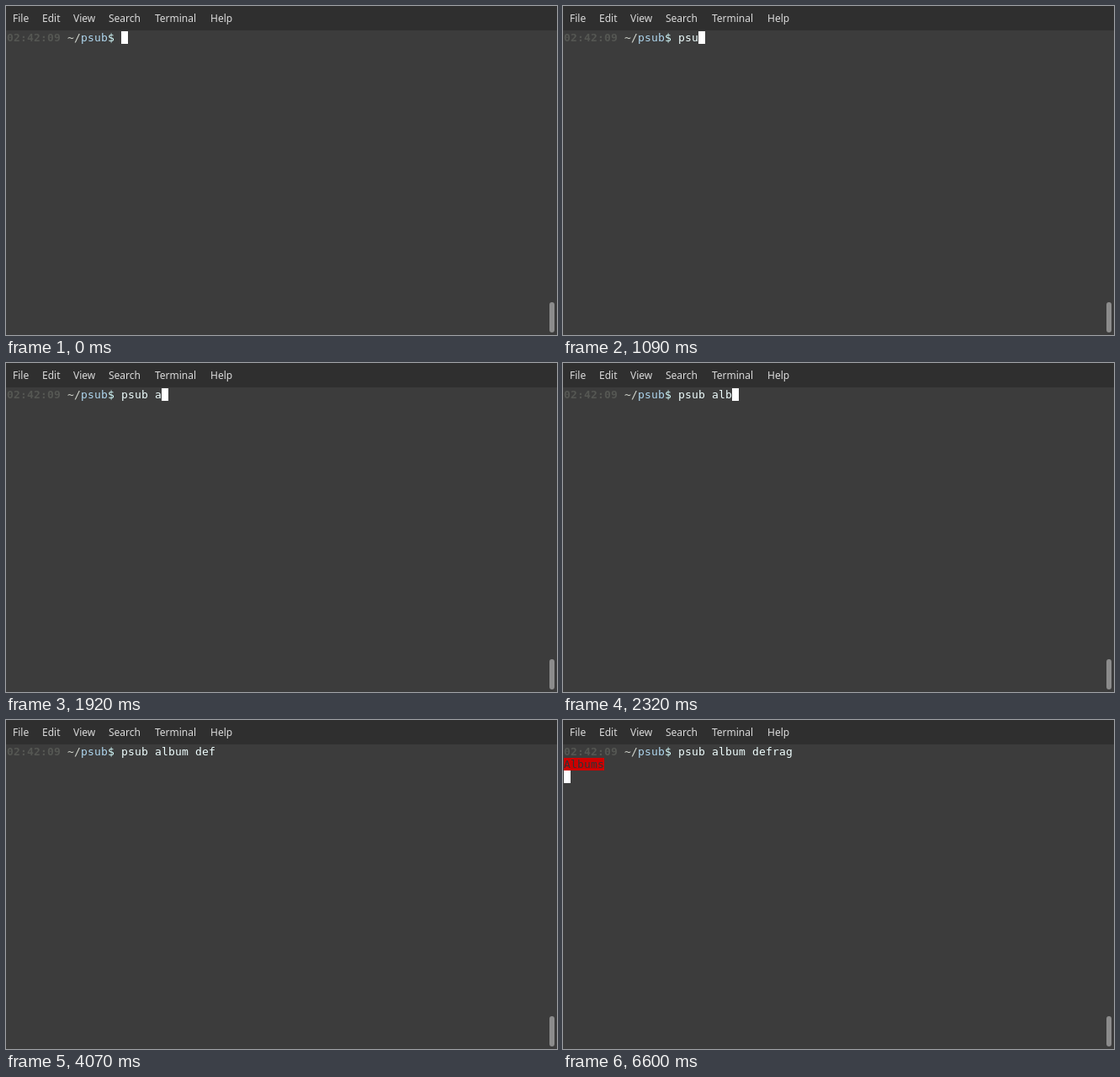
An HTML page for the animation above (8 s loop, 655 by 391 pixels).

```html
<!DOCTYPE html>
<html lang="en">
<head>
<meta charset="utf-8">
<title>Terminal</title>
<style>
  html, body { margin: 0; width: 100%; height: 100%; overflow: hidden; background: #3c3c3c; }
  #stage { position: relative; width: 655px; height: 391px; overflow: hidden; background: #3c3c3c; }
  #menu { position: absolute; left: 0; top: 0; width: 100%; height: 29px; background: #2f2f2f;
    font: 12px/17px "Noto Sans", sans-serif; color: #dadada; }
  #menu span { position: absolute; top: 6px; white-space: pre; }
  .row { position: absolute; left: 1px; height: 15px; white-space: pre;
    font: 13px/15px "DejaVu Sans Mono", monospace; letter-spacing: calc(8px - 1ch); }
  .time { color: #555753; font-weight: bold; }
  .home { color: #d3d7cf; }
  .dir { color: #afd7ef; }
  .mark { color: #d7ffff; }
  #cmd { color: #f0ffff; }
  #out { top: 45px; width: 48px; background: #c00; color: #2e3436; }
  #cursor { position: absolute; left: 0; top: 0; width: 8px; height: 15px; background: #fff; }
  #bar { position: absolute; left: 646px; top: 352px; width: 6px; height: 36px;
    border-radius: 3px; background: #8c8c8c; }
</style>
</head>
<body>
<div id="stage">
  <div id="menu">
    <span style="left:8px">File</span>
    <span style="left:43px">Edit</span>
    <span style="left:80px">View</span>
    <span style="left:122px">Search</span>
    <span style="left:177px">Terminal</span>
    <span style="left:243px">Help</span>
  </div>
  <div class="row" style="top:30px"><span class="time">02:42:09</span> <span class="home">~/</span><span class="dir">psub</span><span class="mark">$</span></div>
  <div class="row" id="cmd" style="left:137px;top:30px"></div>
  <div class="row" id="out">Albums</div>
  <div id="cursor"></div>
  <div id="bar"></div>
</div>
<script>
  const LOOP = 8000, CELL = 8, ROW = 15;
  const HIDE = 2380, OUTPUT = 6600;
  const command = "psub album defrag";
  // Time each character of the command appears
  const keys = [740, 980, 1090, 1410, 1490, 1920, 2060, 2320, 2380,
    2680, 3000, 3660, 3850, 4070, 4420, 4640, 4780];

  const [cmd, out, cursor] = ["cmd", "out", "cursor"].map(id => document.getElementById(id));
  const show = (el, on) => { el.style.visibility = on ? "visible" : "hidden"; };

  function draw(t) {
    const typed = keys.filter(k => k <= t).length;
    const done = t >= OUTPUT;
    cmd.textContent = command.slice(0, typed);
    show(out, done);
    show(cursor, t < HIDE || done);
    const x = done ? 1 : 137 + typed * CELL;
    const y = done ? 30 + 2 * ROW : 30;
    cursor.style.transform = `translate(${x}px, ${y}px)`;
  }

  const start = performance.now();
  function tick() {
    draw((performance.now() - start) % LOOP);
    requestAnimationFrame(tick);
  }
  tick();
</script>
</body>
</html>
```
